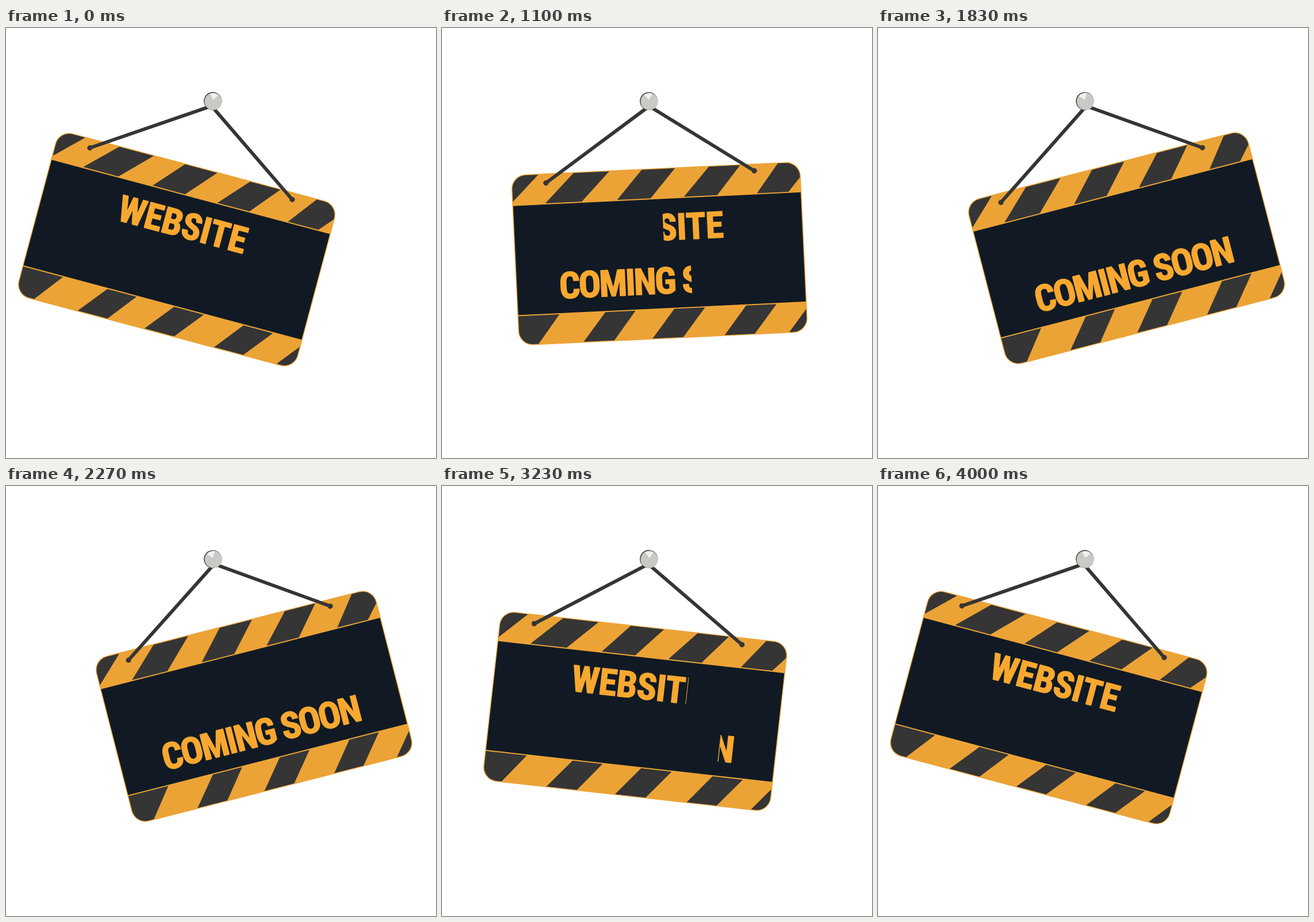
An HTML page with a canvas for the animation above (4030 ms loop, 748x748 px).

```html
<!DOCTYPE html>
<html lang="en">
<head>
<meta charset="utf-8">
<title>Swinging sign</title>
<style>
  html, body { margin: 0; width: 100%; height: 100%; overflow: hidden; background: #fff; }
  canvas { display: block; }
</style>
</head>
<body>
<canvas id="stage" width="748" height="748"></canvas>
<script>
const ctx = document.getElementById('stage').getContext('2d');
const LOOP = 4030, STEP = 100 / 3, MAX_ANGLE = 14.95 * Math.PI / 180;
const ORANGE = '#eca336', LETTER = '#f8a830', GREY = '#353535', NAVY = '#111a24';

// All board coordinates are relative to the pin, with the board level.
const LEFT = -246, RIGHT = 257.5, TOP = 117.5, BOTTOM = 414.5;

// Stripes: x of the upper edge (from, to), x of the lower edge (from, to).
const topStripes = [
  [-300, -198, -300, -250], [-136.5, -74.5, -188.5, -125], [-18, 40, -63.5, -5],
  [99, 153.5, 53, 111], [219, 279, 180, 235]
];
const bottomStripes = [
  [-300, -173, -300, -212], [-93, -40.5, -133.5, -80], [27, 80.5, -13.5, 40],
  [152, 205, 112, 164.5], [265, 320, 224.5, 280]
];

const words = [
  { text: 'WEBSITE', x: -110, middle: 220.3, width: 229, from: -170, to: 121 },
  { text: 'COMING SOON', x: -171, middle: 313, width: 353, from: -175, to: 195 }
];

const clamp = v => Math.min(1, Math.max(0, v));
const fontOf = size =>
  `900 condensed ${size}px "Roboto Condensed", "Open Sans Condensed", "Open Sans", Roboto, sans-serif`;

// Largest size up to 64px that sits in the word's space with slight tracking.
function measure(word) {
  ctx.font = fontOf(64);
  const natural = ctx.measureText(word.text).width;
  const scale = Math.min(1, word.width * 1.09 / natural);
  word.font = ctx.font = fontOf(64 * scale);
  word.tracking = (word.width - natural * scale) / word.text.length;
  word.base = word.middle + ctx.measureText('N').actualBoundingBoxAscent / 2;
}

// Ease in and out along a cubic curve, solved by bisection.
function ease(x) {
  let lo = 0, hi = 1, s;
  for (let i = 0; i < 24; i++) {
    s = (lo + hi) / 2;
    const r = 1 - s;
    if (3 * r * r * s * .5 + 3 * r * s * s * .47 + s * s * s < x) lo = s;
    else hi = s;
  }
  return s * s * (3 - 2 * s);
}

function disc(x, y, r, color) {
  ctx.fillStyle = color;
  ctx.beginPath();
  ctx.arc(x, y, r, 0, 2 * Math.PI);
  ctx.fill();
}

function panel(inset, radius) {
  ctx.beginPath();
  ctx.roundRect(LEFT + inset, TOP + inset, RIGHT - LEFT - 2 * inset, BOTTOM - TOP - 2 * inset, radius);
}

function drawStripes(list, y1, y2) {
  ctx.fillStyle = GREY;
  for (const [a, b, c, d] of list) {
    ctx.beginPath();
    ctx.moveTo(a, y1);
    ctx.lineTo(b, y1);
    ctx.lineTo(d, y2);
    ctx.lineTo(c, y2);
    ctx.fill();
  }
}

function drawBoard() {
  panel(0, 25);
  ctx.fillStyle = ORANGE;
  ctx.fill();
  ctx.save();
  panel(1.4, 23.6);
  ctx.clip();
  drawStripes(topStripes, 118.5, 169.2);
  drawStripes(bottomStripes, 363.3, 413.5);
  ctx.fillStyle = NAVY;
  ctx.fillRect(LEFT, 171.2, RIGHT - LEFT, 190.1);
  ctx.restore();
}

// Shows the part of a word right of the wipe edge, or left of it.
function drawWord(word, wipe, leaving) {
  const edge = word.from + (word.to - word.from) * wipe;
  ctx.save();
  ctx.beginPath();
  if (leaving) ctx.rect(edge, 172, 300 - edge, 189);
  else ctx.rect(-300, 172, edge + 300, 189);
  ctx.clip();
  ctx.font = word.font;
  ctx.letterSpacing = word.tracking + 'px';
  ctx.fillStyle = ctx.strokeStyle = LETTER;
  ctx.lineWidth = 1.5;
  ctx.lineJoin = 'round';
  ctx.fillText(word.text, word.x, word.base);
  ctx.strokeText(word.text, word.x, word.base);
  ctx.restore();
}

function drawRope() {
  ctx.strokeStyle = GREY;
  ctx.lineWidth = 6;
  ctx.lineJoin = 'round';
  ctx.beginPath();
  ctx.moveTo(-185.8, 134);
  ctx.lineTo(0, 9);
  ctx.lineTo(177.4, 130);
  ctx.stroke();
  disc(-185.8, 134, 4.6, GREY);
  disc(177.4, 130, 4.6, GREY);
}

function drawPin() {
  disc(-.2, .1, 15.7, '#454545');
  disc(.6, .7, 15, '#c9c9c6');
  ctx.fillStyle = '#f1f1ef';
  ctx.beginPath();
  ctx.moveTo(0, -2);
  ctx.lineTo(-8, -11);
  ctx.quadraticCurveTo(-1, -15, 6.5, -12);
  ctx.fill();
}

function draw(ms) {
  const t = Math.max(0, Math.floor((ms - 29) / STEP)) / 30;
  const half = t < 2 ? 0 : 1;
  const swing = ease((t - 2 * half) / 2);
  const angle = MAX_ANGLE * (1 - 2 * swing) * (half ? -1 : 1);
  const wipe = clamp((t - 2 * half - .75) / .5);

  ctx.fillStyle = '#fff';
  ctx.fillRect(0, 0, 748, 748);
  ctx.save();
  ctx.translate(360, 127);
  ctx.rotate(angle);
  drawBoard();
  drawWord(words[half], wipe, true);
  drawWord(words[1 - half], wipe, false);
  drawRope();
  drawPin();
  ctx.restore();
}

words.forEach(measure);
const start = performance.now();
(function tick() {
  draw((performance.now() - start) % LOOP);
  requestAnimationFrame(tick);
})();
</script>
</body>
</html>
```
